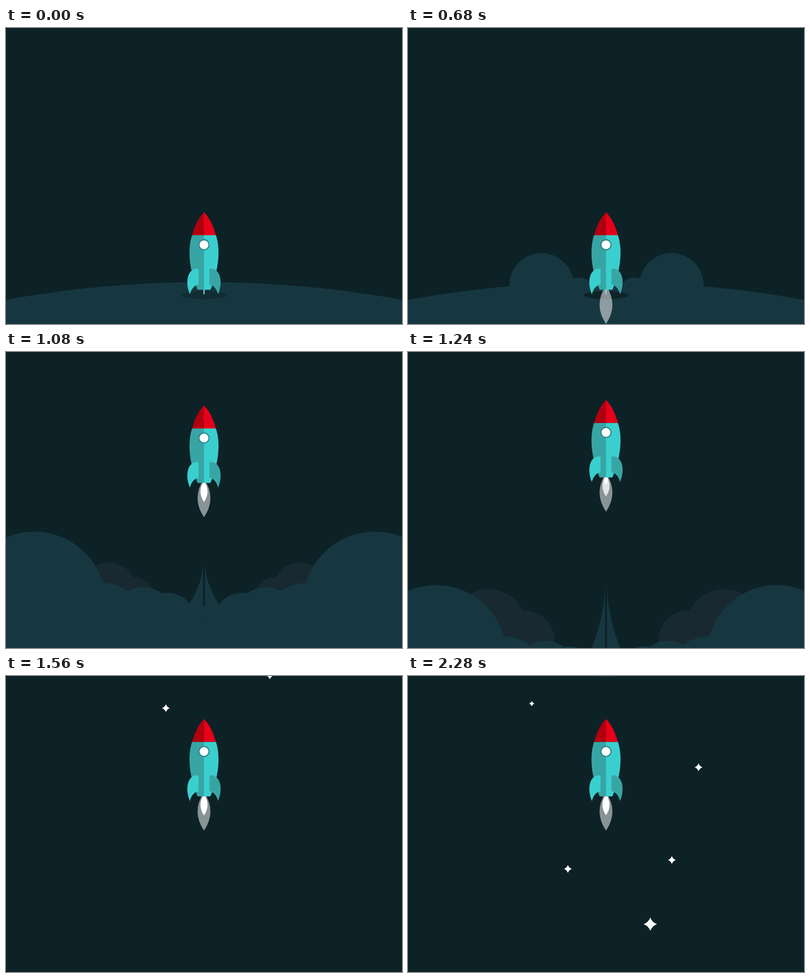
These frames come from a looping animation (800 by 600 pixels, 2.32 s). An HTML page with a canvas:

```html
<!DOCTYPE html>
<html lang="en">
<head>
<meta charset="utf-8">
<title>Rocket launch</title>
<style>
html, body { margin: 0; width: 100%; height: 100%; overflow: hidden; background: #0d2227; }
canvas { display: block; width: 800px; height: 600px; }
</style>
</head>
<body>
<canvas id="stage" width="800" height="600"></canvas>
<script>
const ctx = document.getElementById('stage').getContext('2d');
const LOOP = 2320, STEP = 40, MID = 400, AXIS = 401;
const IGNITE = 600, CRUISE = 1120;
const SKY = '#0d2227', LAND = '#163740', HAZE = '#182932';
const TEAL = '#3acfce', TEAL_DARK = '#38a5a5', RED = '#e60019', RED_DARK = '#b0000f';

const clamp = v => Math.max(0, Math.min(1, v));
const span = (t, start, length) => clamp((t - start) / length);
const easeOut = u => 1 - Math.pow(1 - u, 1.3);
const easeInOut = u => u < 0.5 ? 4 * u ** 3 : 1 - 4 * (1 - u) ** 3;
const mix = (a, b, p) => a + (b - a) * p;

function fill(color, path) {
  ctx.fillStyle = color;
  ctx.fill(path);
}

function disc(x, y, rx, color, ry = rx) {
  const path = new Path2D();
  path.ellipse(x, y, rx, ry, 0, 0, Math.PI * 2);
  fill(color, path);
}

function pair(x, y, r, color) {
  disc(x, y, r, color);
  disc(2 * AXIS - x, y, r, color);
}

// Each puff rolls out from under the rocket, the later ones less far.
function drawPuff(t, i, start, length, restY) {
  const p = easeOut(span(t, start, length));
  if (!p) return;
  const reach = 343 * 0.6 ** i;
  const size = 50 + 97.5 * 0.43 ** i;
  const shrink = size * 0.04 * span(t, 880, 360);
  const r = size * Math.pow(p, 0.85) - shrink;
  pair(MID - reach * p, mix(527, restY, p) - shrink, r, LAND);
}

function drawHaze(t) {
  const p = easeOut(span(t, 900, 300));
  if (!p) return;
  for (let i = 0; i < 2; i++) {
    pair(mix(310, 163 + 73 * i, p), mix(550, 450.5 + 25 * i, p), (78 - 18 * i) * p, HAZE);
  }
}

function drawTrail(t) {
  const height = 184 * Math.pow(span(t, 760, 480), 1.1);
  if (!height) return;
  const base = 542, top = base - height;
  for (const side of [-1, 1]) {
    const x = MID + side * 2;
    const path = new Path2D();
    path.moveTo(x, top);
    path.quadraticCurveTo(x, top + height / 2, x + side * 51, base);
    path.lineTo(x, base);
    fill(LAND, path);
  }
}

function drawGround(t, lift) {
  const drop = 108.5 * Math.pow(Math.max(0, t - CRUISE) / 120, 1.5);
  if (drop > 600) return;
  ctx.save();
  ctx.translate(0, drop);
  drawHaze(t);
  disc(MID, 515 + 2240, 2240, LAND);
  drawPuff(t, 0, IGNITE, 260, 511.5);
  drawPuff(t, 1, IGNITE + 20, 280, 560);
  drawPuff(t, 2, IGNITE + 80, 380, 545);
  drawPuff(t, 3, IGNITE + 140, 340, 546);
  drawTrail(t);
  const size = Math.max(0, 1 - lift / 280);
  ctx.globalAlpha = mix(0.5, 0.92, span(t, 560, 120));
  disc(MID, 541.5, 45 * size, SKY, 8 * size);
  ctx.restore();
}

// Falls to endY at the end of the loop; drag slows it on the way.
function drawStar(t, x, r, endY, speed, drag = 0) {
  const left = LOOP - STEP - t;
  const y = endY - left * (speed + drag * left);
  if (y < -r) return;
  const path = new Path2D();
  path.moveTo(x, y - r);
  for (let i = 0; i < 4; i++) {
    const a = i * Math.PI / 2, c = r * 0.38;
    path.quadraticCurveTo(
      x + c * Math.cos(a - Math.PI / 4), y + c * Math.sin(a - Math.PI / 4),
      x + r * Math.cos(a), y + r * Math.sin(a));
  }
  fill('#fff', path);
}

function drawSpace(t) {
  drawStar(t, 323, 8, 391, 0.51, -0.00008);
  drawStar(t, 533, 8, 373, 0.455, 0.00009);
  drawStar(t, 489.5, 13.5, 503, 0.66, 0.00067);
  drawStar(t, 587, 8, 185, 0.5);
  drawStar(t, 250, 5.5, 56, 0.4);
  if (t > 2240) disc(MID, 2 - 121, 121, LAND);
}

function lens(top, bottom, half, alpha) {
  const mid = (top + bottom) / 2;
  const path = new Path2D();
  path.moveTo(MID, top);
  path.quadraticCurveTo(MID + half * 2, mid, MID, bottom);
  path.quadraticCurveTo(MID - half * 2, mid, MID, top);
  fill(`rgba(255,255,255,${alpha})`, path);
}

const nose = new Path2D('M400 373.3C412 386 419 402 424 420H400Z');
const hull = new Path2D('M400 420H424C432 443 433 482 413 530.5H400Z');
const fin = new Path2D('M411 488H415C431 488 440 512 428.5 540C426 530 420 521 411 520Z');

function drawFlame(t) {
  const lit = t >= IGNITE;
  if (lit) lens(522, mix(522, 600, span(t, 560, 120)), 13, 0.51);
  ctx.fillStyle = '#a0e2e0';
  ctx.fillRect(399, 530, 2, 10);
  const beat = Math.floor(t / STEP) % 3;
  if (!lit || beat === 2) return;
  lens(526, 569, 7.2, beat === 0 ? 1 : 0.76);
  if (beat === 1) lens(524, 546, 3.6, 1);
}

function drawHalf(side, red, body, wing) {
  ctx.save();
  ctx.translate(MID, 0);
  ctx.scale(side, 1);
  ctx.translate(-MID, 0);
  fill(body, hull);
  fill(red, nose);
  fill(wing, fin);
  ctx.restore();
}

function drawRocket(t, lift) {
  ctx.save();
  ctx.translate(0, -lift);
  drawFlame(t);
  drawHalf(-1, RED_DARK, TEAL_DARK, TEAL);
  drawHalf(1, RED, TEAL, TEAL_DARK);
  disc(MID, 439.4, 11.3, '#2f8788');
  disc(MID, 439.4, 9, '#fff');
  ctx.restore();
}

function draw(t) {
  const lift = 266.2 * easeInOut(span(t, 723, 397)) + 20.2 * easeInOut(span(t, CRUISE, 240));
  ctx.fillStyle = SKY;
  ctx.fillRect(0, 0, 800, 600);
  drawGround(t, lift);
  drawSpace(t);
  drawRocket(t, lift);
}

let begin;
function tick(now) {
  if (begin === undefined) begin = now;
  const t = Math.max(0, now - begin) % LOOP;
  draw(Math.floor(t / STEP + 0.001) * STEP);
  requestAnimationFrame(tick);
}
draw(0);
requestAnimationFrame(tick);
</script>
</body>
</html>
```
